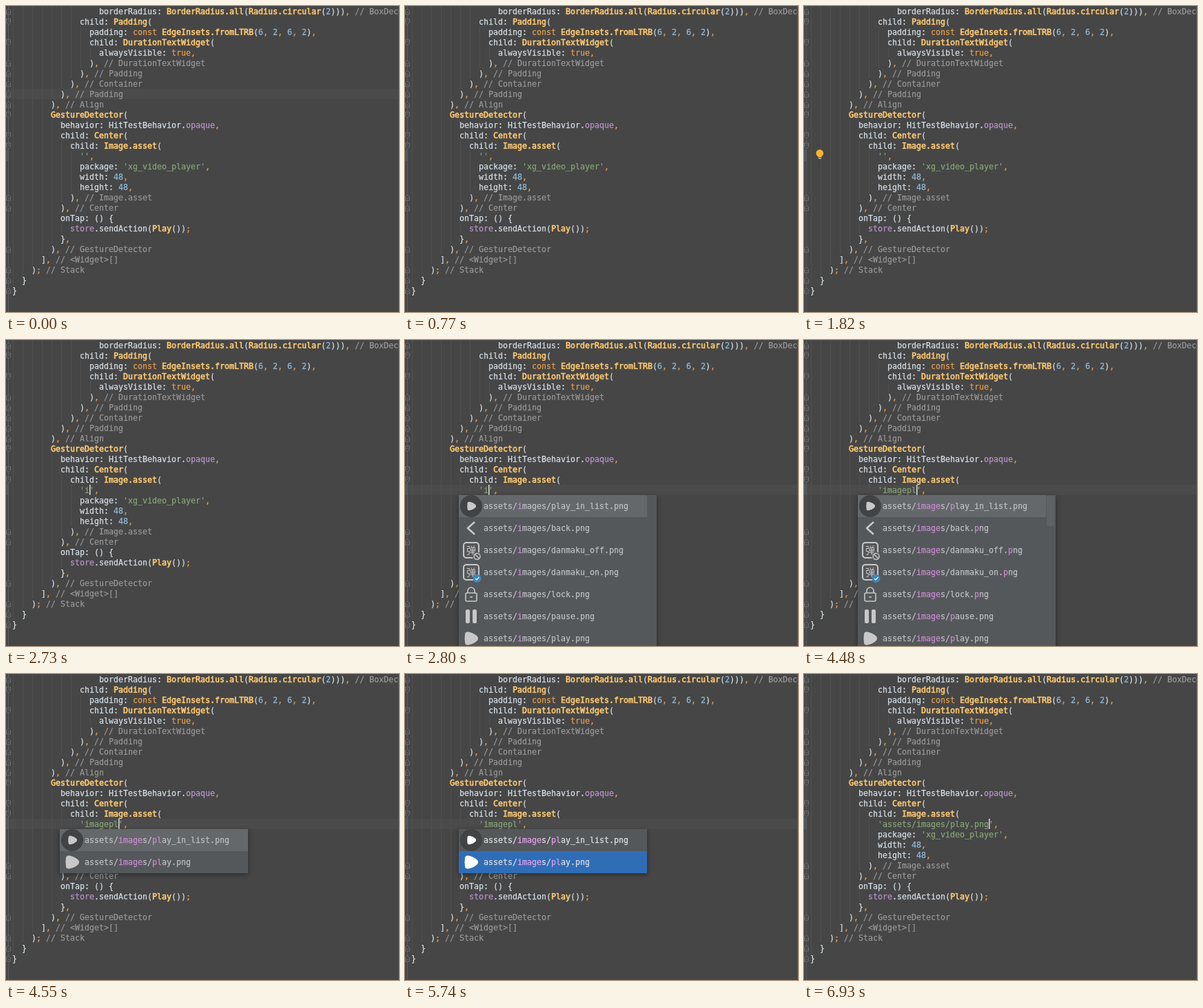
Recreate the animation shown at these times as an HTML page with a canvas. Size 570 by 444 pixels, loop 7.35 s.

```html
<!DOCTYPE html>
<html lang="en">
<head>
<meta charset="utf-8">
<style>
  html, body { margin: 0; width: 100%; height: 100%; overflow: hidden; background: #464646; }
  canvas { display: block; }
</style>
</head>
<body>
<canvas id="stage" width="570" height="444"></canvas>
<script>
const ctx = document.getElementById('stage').getContext('2d');
const LOOP = 7350, ROW = 15, COL = 7, LEFT = 9, EDIT_ROW = 14;
const POPUP_OPEN = 2800, FILTERED = 4550, ARROW_DOWN = 5670, ACCEPTED = 6510;
const BACK = '#464646', ROW_LIGHT = '#4b4b4b';
const FONT = '11.63px "DejaVu Sans Mono", monospace';

const code = `
                  borderRadius: BorderRadius.all(Radius.circular(2))), // BoxDecoration
              child: Padding(
                padding: const EdgeInsets.fromLTRB(6, 2, 6, 2),
                child: DurationTextWidget(
                  alwaysVisible: true,
                ), // DurationTextWidget
              ), // Padding
            ), // Container
          ), // Padding
        ), // Align
        GestureDetector(
          behavior: HitTestBehavior.opaque,
          child: Center(
            child: Image.asset(
              '',
              package: 'xg_video_player',
              width: 48,
              height: 48,
            ), // Image.asset
          ), // Center
          onTap: () {
            store.sendAction(Play());
          },
        ), // GestureDetector
      ], // <Widget>[]
    ); // Stack
  }
}`.slice(1).split('\n');

const tokens = [
  ['comment', /\/\/.*/], ['string', /'[^']*'/], ['number', /\d+/],
  ['keyword', /\b(?:const|true)\b|[,;]/], ['member', /\b(?:opaque|store)\b/],
  ['call', /\b[A-Z][\w.]*(?=\()/], ['plain', /\w+|[^\s\w]/]
];
const tokenRule = new RegExp(tokens.map(([name, rule]) => `(?<${name}>${rule.source})`).join('|'), 'g');
const colors = {
  comment: '#959595', string: '#86a276', number: '#8cb8d8', keyword: '#e39b4c',
  member: '#b592c6', call: '#ffca72', plain: '#d3dde5'
};

// Indent guides: column, first row, last row
const guides = [
  [0, 0, 26], [2, 0, 25], [4, 0, 24], [6, 0, 23], [8, 0, 8], [10, 0, 7], [12, 0, 6],
  [14, 2, 5], [16, 4, 4], [8, 11, 22], [10, 13, 18], [12, 14, 17], [10, 21, 21]
];
const foldStarts = [1, 3, 10, 12, 13];
const foldEnds = [0, 5, 6, 7, 8, 9, 18, 19, 23, 25, 26, 27];

// Typed text between the quotes, by start time
const typing = [
  [0, ''], [2380, 'i'], [3430, 'im'], [3500, 'imag'], [3570, 'image'],
  [4130, 'imagep'], [4340, 'imagepl'], [ACCEPTED, 'assets/images/play.png']
];
const caretShown = [
  [70, 560], [1050, 1540], [2380, 3010], [3430, 3990], [4130, 4760], [5250, 5460], [ACCEPTED, LOOP]
];
const during = (t, from, to) => t >= from && t < to;

function box(x, y, w, h, color) {
  ctx.fillStyle = color;
  ctx.fillRect(x, y, w, h);
}

// A thin outline gives the letters their weight
function text(str, x, y, color, weight = 0.25) {
  ctx.font = FONT;
  ctx.fillStyle = ctx.strokeStyle = color;
  ctx.lineWidth = weight;
  ctx.lineJoin = 'round';
  ctx.fillText(str, x, y);
  ctx.strokeText(str, x, y);
}

function disc(x, y, r, color) {
  ctx.fillStyle = color;
  ctx.beginPath();
  ctx.arc(x, y, r, 0, 7);
  ctx.fill();
}

function path(d, color, width) {
  const shape = new Path2D(d);
  if (width) {
    ctx.strokeStyle = color;
    ctx.lineWidth = width;
    ctx.stroke(shape);
  } else {
    ctx.fillStyle = color;
    ctx.fill(shape);
  }
}

function round(x, y, w, h, r, color, width) {
  const shape = new Path2D();
  shape.roundRect(x, y, w, h, r);
  path(shape, color, width);
}

function drawLine(line, row) {
  for (const match of line.matchAll(tokenRule)) {
    const kind = tokens.find(([name]) => match.groups[name] !== undefined)[0];
    text(match[0], LEFT + COL * match.index, 12 + ROW * row, colors[kind], kind === 'call' ? 0.6 : 0.25);
  }
}

function drawGutter() {
  box(3, 0, 1, 444, '#5e5e5e');
  box(0, 208, 3, 17, '#4e565c');
  const fold = (row, dir) => {
    const y = 8 + ROW * row;
    const d = `M.5 ${y - 4 * dir}H6.5V${y + dir}L3.5 ${y + 4 * dir}L.5 ${y + dir}Z`;
    path(d, BACK);
    path(d, '#6e6e6e', 1);
    path(`M2 ${y - dir}H5`, '#6e6e6e', 1);
  };
  foldStarts.forEach(row => fold(row, 1));
  foldEnds.forEach(row => fold(row, -1));
}

function drawBulb() {
  disc(22.8, 213.5, 5.3, '#fcb52c');
  box(20.5, 217, 5, 2, '#fcb52c');
  box(20.5, 219.5, 5, 1, '#c4c4c4');
  box(21.5, 221, 3, 1, '#c4c4c4');
}

// Icons are drawn around (0, 0)
function playShape(size, color) {
  ctx.save();
  ctx.scale(size, size);
  path('M-9-6Q-9-10-4-9.5Q4-8 9-3Q11 0 9 3Q4 8-4 9.5Q-9 10-9 6Q-10 0-9-6Z', color);
  ctx.restore();
}

function commentIcon(color) {
  round(-11, -11, 22, 22, 4, color, 2);
  ctx.font = '500 14px "Noto Sans CJK SC", "Noto Sans CJK", "Noto Sans CJK JP", sans-serif';
  ctx.fillStyle = color;
  ctx.textAlign = 'center';
  ctx.fillText('弹', 0, 5);
  ctx.textAlign = 'left';
}

const icons = {
  play_in_list(color) {
    disc(0, 0, 16, '#414345');
    ctx.translate(0.5, 0);
    playShape(0.66, color);
  },
  back: color => path('M5-9L-5 0L5 9', color, 2.5),
  danmaku_off(color) {
    commentIcon(color);
    disc(8.5, 9, 6.5, '#55585a');
    path('M13 9A4.5 4.5 0 1 1 4 9A4.5 4.5 0 1 1 13 9M5.5 6L11.5 12', color, 1.5);
  },
  danmaku_on(color) {
    commentIcon(color);
    disc(8.5, 9, 6, '#3c87bd');
    path('M5.8 9L8 11L11.5 7', '#e8e8e8', 1.3);
  },
  lock(color) {
    round(-8, -2, 16, 12, 2, color, 1.6);
    path('M-5-2V-5A5 5 0 0 1 5-5V-2M-2 4H2', color, 1.6);
  },
  pause(color) {
    round(-8, -10, 6, 20, 2, color);
    round(2, -10, 6, 20, 2, color);
  },
  play: color => playShape(1, color)
};

function drawPopup(t, typed) {
  const filtered = t >= FILTERED;
  const chosen = t >= ARROW_DOWN;
  const names = filtered ? ['play_in_list', 'play'] : Object.keys(icons);
  const width = filtered ? 273 : 287, height = filtered ? 64 : 224;
  const ink = chosen ? '#dedede' : '#bcbec0';
  ctx.save();
  ctx.shadowColor = 'rgba(0,0,0,.4)';
  ctx.shadowBlur = 7;
  ctx.shadowOffsetY = 2;
  box(78, 225, width, height, '#55585a');
  ctx.restore();
  if (chosen) box(78, 257, 273, 32, '#2f6db7');
  else box(78, 225, 273, 32, '#65686a');
  if (!filtered && t >= 3430) box(352, 226, 11, 44, '#5f6264');

  names.forEach((name, i) => {
    const y = 241 + 32 * i;
    ctx.save();
    ctx.translate(96, y);
    icons[name](chosen ? '#fff' : '#c8c8c8');
    ctx.restore();
    const label = `assets/images/${name}.png`;
    const pStart = label.indexOf('p', 14);
    const suffix = filtered ? typed.length - 5 : Math.min(1, typed.length - 5);
    const matched = k => during(k, 7, 7 + Math.min(typed.length, 5)) || during(k, pStart, pStart + suffix);
    [...label].forEach((letter, k) => {
      const color = matched(k) ? (chosen ? '#e3a0ec' : '#c78bd0') : ink;
      text(letter, 114 + COL * k, y + 4, color);
    });
  });
}

function draw(t) {
  const typed = typing.findLast(([start]) => t >= start)[1];
  const popup = during(t, POPUP_OPEN, ACCEPTED);
  box(0, 0, 570, 444, BACK);
  if (t < 70) box(0, 120, 570, ROW, ROW_LIGHT);
  if (popup) box(0, 210, 570, ROW, ROW_LIGHT);
  for (const [col, from, to] of guides) {
    box(LEFT + COL * col + 1, ROW * from, 1, ROW * (to - from + 1), '#505050');
  }
  box(569, 0, 1, 444, '#525252');
  drawGutter();
  code.forEach((line, row) => drawLine(row === EDIT_ROW ? line.replace("''", `'${typed}'`) : line, row));
  if (during(t, 1820, 2520)) drawBulb();
  if (caretShown.some(([from, to]) => during(t, from, to))) {
    box(LEFT + COL * (15 + typed.length), 210, 1.5, ROW, '#dcdcdc');
  }
  if (popup) drawPopup(t, typed);
}

function tick() {
  draw(performance.now() % LOOP);
  requestAnimationFrame(tick);
}
tick();
</script>
</body>
</html>
```
